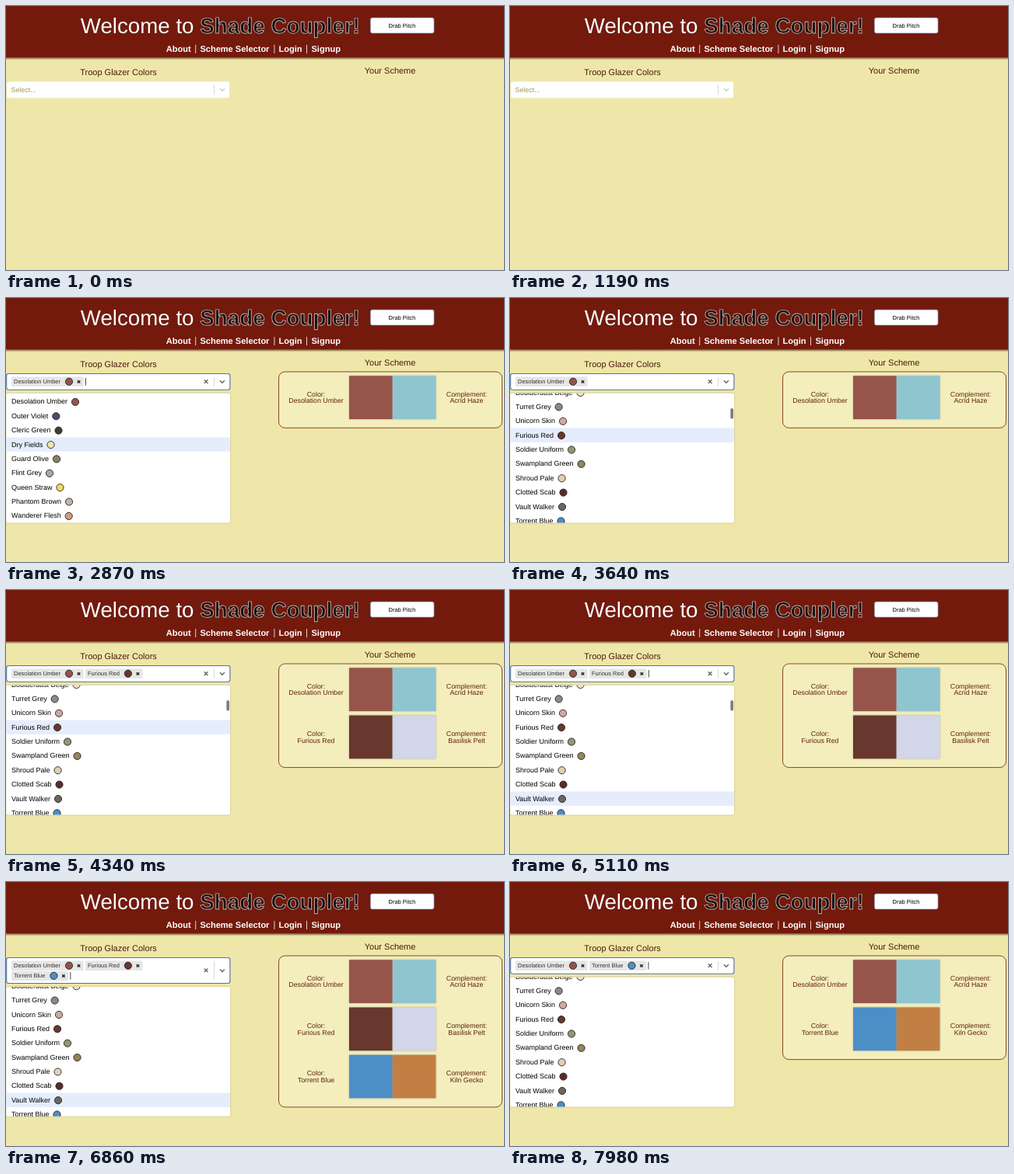
An HTML page that plays this animation: 640 px wide and 340 px high, repeating every 8 s.

```html
<!DOCTYPE html>
<html lang="en">
<head>
<meta charset="utf-8">
<title>Shade Coupler</title>
<style>
  html, body { margin: 0; width: 100%; height: 100%; overflow: hidden; background: #efe7a9; }
  svg { display: block; width: 640px; height: 340px; font-family: "Liberation Sans", Arial, sans-serif; text-rendering: geometricPrecision; }
  .welcome { font-size: 27.7px; fill: #fff; filter: drop-shadow(.6px .6px .6px #0008); }
  .brand { font-size: 27.8px; font-weight: bold; fill: #160e0e; stroke: #c4b4b0; stroke-width: .9px; }
  .nav { font-size: 11.05px; font-weight: bold; fill: #fff; }
  .heading { font-size: 11px; fill: #4a1a0c; }
  .mid { text-anchor: middle; }
  .option { font-size: 9px; fill: #000; }
  .chip { font-size: 7.5px; fill: #333; }
  .label { font-size: 8.8px; fill: #5f200e; text-anchor: middle; }
  .dot { stroke: #222; stroke-width: .9px; }
  .line { fill: none; stroke-width: 1.4px; }
  .swatches { filter: drop-shadow(0 0 1.3px #999b); }
  .menu { filter: drop-shadow(0 .5px .8px #0003); }
</style>
</head>
<body>
<svg viewBox="0 0 640 340">
  <defs>
    <linearGradient id="shade" x2="0" y2="1">
      <stop stop-color="#4a2415" stop-opacity=".75"/>
      <stop offset="1" stop-color="#6b5a30" stop-opacity="0"/>
    </linearGradient>
    <clipPath id="menuClip"><rect x=".3" y="122.8" width="287.7" height="166.8" rx="2.5"/></clipPath>
  </defs>
  <rect width="640" height="340" fill="#efe7a9"/>
  <rect y="66.5" width="640" height="3" fill="url(#shade)"/>
  <rect width="640" height="66.5" fill="#731a0d"/>
  <text class="welcome" x="95.8" y="35">Welcome to</text>
  <text class="brand" x="249.3" y="35">Shade Coupler!</text>
  <rect x="468.3" y="15.1" width="81.8" height="20" rx="2.5" fill="#fff" stroke="#6f7c98" stroke-width=".7"/>
  <text class="mid" x="509" y="27.8" font-size="7.5">Drab Pitch</text>
  <g class="nav">
    <text x="205.8" y="59">About</text>
    <text x="249.4" y="59">Scheme Selector</text>
    <text x="350.5" y="59">Login</text>
    <text x="392.5" y="59">Signup</text>
    <path d="M243.7 50v11M344.9 50v11M386.5 50v11" stroke="#f3e6e2" stroke-width=".9"/>
  </g>
  <text class="heading mid" x="144.5" y="89.2">Troop Glazer Colors</text>
  <text class="heading mid" x="493.6" y="86.6">Your Scheme</text>

  <rect id="control" y="97.5" rx="2.5" fill="#fff"/>
  <text id="placeholder" x="6.5" y="110.6" font-size="8.9" fill="#a59750">Select...</text>
  <path id="separator" stroke="#ccc" stroke-width=".8"/>
  <g id="icons">
    <path id="clear" class="line" d="M254.8 105.3l4.6 4.6m0-4.6l-4.6 4.6" stroke="#666"/>
    <path id="chevron" class="line" d="M274.9 106.3l3 3 3-3"/>
  </g>
  <g id="chips"></g>
  <rect id="caret" width=".9" height="9.5" fill="#333"/>

  <g id="menu" class="menu">
    <g clip-path="url(#menuClip)">
      <rect y="122" width="289" height="169" fill="#fff"/>
      <g id="list"><rect id="hover" width="289" height="18.375" fill="#e5edfd"/></g>
      <rect id="thumb" x="283.3" width="3.8" height="13.6" rx="1.9" fill="#7f7f7f"/>
    </g>
  </g>
  <g id="scheme"></g>
</svg>
<script>
const LOOP = 8000, ROW = 18.375, TOP = 124.3, SCROLL = 232.4, WRAP = 12.2;
const at = { open: 1300, first: 2450, second: 4150, third: 5500, remove: 7200 };

const paints = [
  ['Desolation Umber', '#96544a'], ['Outer Violet', '#4f4a72'], ['Cleric Green', '#34452f'],
  ['Dry Fields', '#f0e3b0'], ['Guard Olive', '#85835c'], ['Flint Grey', '#a9a9a9'],
  ['Queen Straw', '#f0d968'], ['Phantom Brown', '#c4b3a6'], ['Wanderer Flesh', '#cf9f78'],
  ['Bramble Brown', '#7a5a40'], ['Briar Blue', '#5a7a9a'], ['Bronze Loam', '#8a6a3a'],
  ['Boulderdust Beige', '#efe6cc'], ['Turret Grey', '#8a8a8a'], ['Unicorn Skin', '#d0a8a2'],
  ['Furious Red', '#68372d'], ['Soldier Uniform', '#94966f'], ['Swampland Green', '#94855a'],
  ['Shroud Pale', '#e3cfb4'], ['Clotted Scab', '#5a2a2c'], ['Vault Walker', '#6b675e'],
  ['Torrent Blue', '#4c8fc7']
];
const complements = {
  0: ['Acrid Haze', '#8fc5cf'],
  15: ['Basilisk Pelt', '#d2d6e8'],
  21: ['Kiln Gecko', '#c27f43']
};

const $ = id => document.getElementById(id);
const set = (node, attrs) => { for (const k in attrs) node.setAttribute(k, attrs[k]); return node; };
const show = (id, on) => set($(id), { visibility: on ? 'visible' : 'hidden' });

function add(parent, tag, attrs, text) {
  const node = set(document.createElementNS('http://www.w3.org/2000/svg', tag), attrs);
  if (text) node.textContent = text;
  return parent.appendChild(node);
}

// Draws a name followed by its colour dot and returns the dot's centre.
function addPaint(parent, [name, fill], kind, x, y, gap) {
  const text = add(parent, 'text', { class: kind, x, y: y + 3 }, name);
  const cx = x + text.getComputedTextLength() + gap;
  add(parent, 'circle', { class: 'dot', cx, cy: y + .4, r: 4.6, fill });
  return cx;
}

paints.forEach((paint, i) => addPaint($('list'), paint, 'option', 7, TOP + (i + .5) * ROW, 10));

function drawChips(picks) {
  const chips = $('chips');
  let x = 7, y = 101.6;
  chips.replaceChildren();
  for (const pick of picks) {
    const group = add(chips, 'g', {});
    const back = add(group, 'rect', { height: 12.4, rx: 1.3, fill: '#e6e6e6' });
    const dot = addPaint(group, paints[pick], 'chip', 3, 5.7, 11);
    const width = dot + 18.5;
    set(back, { width });
    add(group, 'path', { class: 'line', d: `M${dot + 10.8} 4.6l3.4 3.4m0-3.4l-3.4 3.4`, stroke: '#222' });
    if (x + width > 248) { x = 7; y += 13.1; }
    set(group, { transform: `translate(${x} ${y})` });
    x += width + 2.5;
  }
  set($('caret'), { x: picks.length ? x : 6.3, y: y + 1.4 });
  return y > 102 ? WRAP : 0;
}

function drawScheme(picks) {
  const scheme = $('scheme');
  scheme.replaceChildren();
  if (!picks.length) return;
  add(scheme, 'rect', {
    x: 350.5, y: 95, width: 287, height: 11 + 61.3 * picks.length, rx: 8,
    fill: '#f3eebc', stroke: '#75341a', 'stroke-width': .9
  });
  picks.forEach((pick, i) => {
    const row = add(scheme, 'g', { transform: `translate(0 ${i * 61.2})` });
    const pair = add(row, 'g', { class: 'swatches' });
    const side = ([name, fill], title, textX, x) => {
      add(row, 'text', { class: 'label', x: textX, y: 127 }, title);
      add(row, 'text', { class: 'label', x: textX, y: 135.4 }, name);
      add(pair, 'rect', { x, y: 100.3, width: 55.7, height: 55.7, fill });
    };
    side(paints[pick], 'Color:', 398.5, 441);
    side(complements[pick], 'Complement:', 592, 496.7);
  });
}

// Eased interpolation through [time, value] stops.
function track(stops, t) {
  const i = stops.findIndex(s => s[0] > t);
  if (i < 0) return stops[stops.length - 1][1];
  if (i === 0) return stops[0][1];
  const [t0, a] = stops[i - 1], [t1, b] = stops[i];
  const p = (t - t0) / (t1 - t0);
  return a + (b - a) * p * p * (3 - 2 * p);
}

const pointer = [[2500, 133], [2830, 188], [2940, 188], [3100, 178], [4350, 178], [5000, 266], [5110, 268], [5350, 287]];
const scrolling = [[2950, 0], [3560, SCROLL]];

function picksAt(t) {
  if (t >= at.remove) return [0, 21];
  if (t >= at.third) return [0, 15, 21];
  if (t >= at.second) return [0, 15];
  return t >= at.first ? [0] : [];
}

let drawn = null, shift = 0;

function render(t) {
  const picks = picksAt(t), open = t >= at.open;
  if (String(picks) !== drawn) {
    drawn = String(picks);
    shift = drawChips(picks);
    drawScheme(picks);
  }
  set($('control'), {
    x: open ? .7 : 1.2, width: open ? 287.2 : 285.8, height: 20.8 + shift,
    stroke: open ? '#4b72ab' : '#f6f3e6', 'stroke-width': open ? 1.1 : .5
  });
  set($('separator'), { d: `M267.6 102v${11.8 + shift}` });
  set($('icons'), { transform: `translate(0 ${shift / 2})` });
  set($('chevron'), { stroke: open ? '#666' : '#ccc' });
  show('placeholder', !picks.length);
  show('clear', picks.length);
  show('caret', open && (t + 320) % 1000 < 500);

  const scroll = track(scrolling, t);
  const row = Math.floor((track(pointer, t) - TOP - shift + scroll) / ROW);
  show('menu', open);
  set($('menu'), { transform: `translate(0 ${shift})` });
  set($('list'), { transform: `translate(0 ${-scroll})` });
  set($('hover'), { y: TOP + row * ROW, opacity: t < at.remove ? 1 : 0 });
  set($('thumb'), {
    y: 124 + 18 * scroll / SCROLL,
    opacity: track([[2930, 0], [2980, 1], [6400, 1], [6650, 0]], t)
  });
}

const start = performance.now();
function tick() {
  render((performance.now() - start) % LOOP);
  requestAnimationFrame(tick);
}
tick();
</script>
</body>
</html>
```
